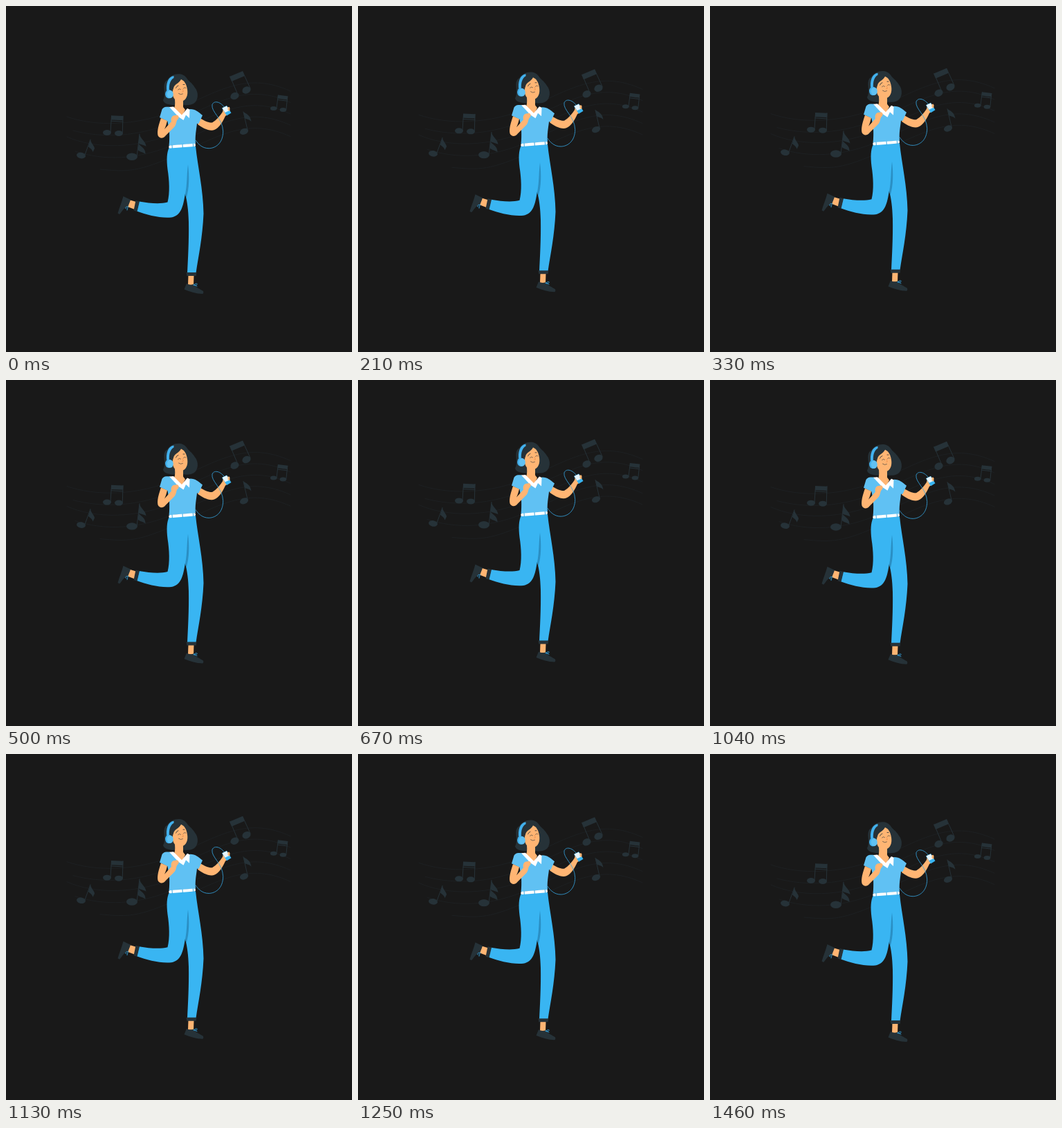
Animation, 500 px wide and 500 px high, one loop 1.5 s. Source, as an HTML page:

```html
<!DOCTYPE html>
<html lang="en">
<head>
<meta charset="utf-8">
<title>Dancing to music</title>
<style>
html, body { margin: 0; width: 100%; height: 100%; overflow: hidden; background: #191919; }
svg { display: block; width: 100%; height: 100%; }
.dark { fill: #263238; }
.skin { fill: #ffb573; }
.pants { fill: #39b5f2; }
.shirt { fill: #60c1f3; }
.white { fill: #fff; }
.line { fill: none; stroke-linecap: round; stroke-linejoin: round; }
.ink { stroke: #263238; }
.blue { stroke: #37a9e6; }
</style>
</head>
<body>
<svg viewBox="0 0 500 500">
<g id="scene">
  <g id="staff" class="line" stroke="#1f2325" stroke-width=".8"></g>

  <g id="notes" class="dark">
    <path d="M323 102L342 94L345 101L326 109Z"/>
    <path class="line ink" d="M324 102L335 128M342 95L353 119"/>
    <ellipse transform="translate(330.5 130) rotate(-25)" rx="6.3" ry="5"/>
    <ellipse transform="translate(347.5 121.5) rotate(-25)" rx="6.3" ry="5"/>

    <path d="M393 128.5L407.3 130.2L406.7 135.5L392.5 133.8Z"/>
    <path class="line ink" d="M393.3 129L391 148M392.5 135.5L406 137.2M406.8 131L404.8 150"/>
    <ellipse cx="386.7" cy="148" rx="4.8" ry="3"/>
    <ellipse cx="400.4" cy="150" rx="4.8" ry="3"/>

    <path d="M343 153C347 156 353 157 354.5 167C351 163 347 164 345 162Z"/>
    <path class="line ink" d="M343 153L349 179"/>
    <ellipse transform="translate(344 181.3) rotate(-22)" rx="6.3" ry="4.3"/>

    <path d="M152 158.3L169.5 159L169.2 165.3L152 164.5Z"/>
    <path class="line ink" d="M152.5 159L151 182M152 166.2L169 167.2M169 159L168.3 183"/>
    <ellipse cx="146" cy="183" rx="6" ry="4"/>
    <ellipse cx="163" cy="184" rx="6" ry="4"/>

    <path d="M122 193C123 199 128 202 128 206L125.5 211C124 206 121 206 119 203Z"/>
    <path class="line ink" d="M122 193L114 215"/>
    <ellipse transform="translate(108.5 216) rotate(10)" rx="6.5" ry="4.3"/>

    <path d="M193 185C194 192 202 195 202.5 203C199 200 194 201 191.5 198ZM191.5 199C195 203 202 206 201.5 214C198 211 193 211 190.5 208Z"/>
    <path class="line ink" d="M193 185L189.3 216"/>
    <ellipse cx="182" cy="217.8" rx="8" ry="5.2"/>
  </g>

  <g id="feet">
    <path class="skin" d="M178 280L188 283L186 294L175.5 290Z"/>
    <path class="dark" d="M169.5 275L180 280C179 284 177 287 176 291C170 291 168 297 164 301L161.5 299.5C164 291 167 284 169.5 275Z"/>
    <path class="line blue" stroke-width=".8" d="M177 290C173 289 171 293 174 293M176 291L175 295"/>
    <path class="skin" d="M263.5 389H271.5L271 403H263Z"/>
    <path class="dark" d="M261 401C264 403 268 403 271 402C274 407 281 409 285 412Q286 415 284 416C275 416 266 413 257.5 409.5Z"/>
    <path class="line blue" stroke-width=".8" d="M271 403C275 400 278 401 275 403.5L271 403L276 405"/>
  </g>

  <g id="legs">
    <path class="pants" d="M236 204C232 212 232 222 233.5 236C236 252 237 270 233.5 283.5C223 286.5 207 285 192.5 282.5L189 296.5C204 302 223 307 239 305.5C253 303 256 290 259 271C262 284 263.5 294 264 312C264.5 340 263 364 262 386H274.5C278 362 284 335 285.5 300C285 265 277 232 274 202.5Z"/>
    <path fill="#2a8fc4" d="M263 229C261 245 262 257 259 272L260.5 278C265 263 265 246 263 229Z"/>
    <path class="dark" d="M187.5 281L193 282.3L189.5 297L184.5 295.5Z"/>
    <path class="dark" d="M260.5 385H275.3L274.7 390H261.3Z"/>
  </g>

  <g id="head">
    <path class="dark" d="M233 107C239 97 255 95 261 104C264 109 268 110 273 118C279 125 278 137 271 141C264 145 257 142 251 143H240C232 142 228 140 227 136C231 129 228 122 228.5 115Q229 109 233 107Z"/>
    <path class="skin" d="M242 119C243 113 250 112 253 106C258 108 260.5 113 261.5 118C263.5 126 262 134 256 137L256 146L259 150L254 160L242 149Q245 146 244 135C240 130 240 124 242 119Z"/>
    <path class="line" stroke="#263238" stroke-width=".6" d="M248.5 121Q250.5 118.500 252.500 120.500M256.500 119Q258.500 116.500 260 118.500M249.500 126.500Q252.500 129 255.500 127"/>
    <path class="line" stroke="#263238" stroke-width=".8" d="M245.500 118.500Q246.500 115.500 249 115M256 113.500L258 113.500"/>
    <path class="line" stroke="#e78d4b" stroke-width=".7" d="M255 120L256.500 123.500L254.500 124"/>
    <path fill="#42b1ee" d="M242.500 101C234 102 230.500 113 232.500 124L236 122C235.500 114 237 107 242.500 104Z"/>
    <ellipse fill="#42b1ee" cx="235.300" cy="127.300" rx="5.200" ry="6.200"/>
    <ellipse class="shirt" cx="237.200" cy="127.500" rx="4.600" ry="5.800"/>
  </g>

  <g id="body">
    <path class="skin" d="M280 162C287 166 293 169 298 168.500C304 165 309 159 313 153L314 148L321 146C325 149 324 155 317 159C313 168 308 176 301 179C295 182 283 176 277 171Z"/>
    <path class="shirt" d="M237 146C229 145 226 147 225 151L222 161L233.500 166.500L236 181Q236.500 193 235.500 202L274 199C273 188 275 179 276 170L278.500 170L284 158C278 153 274 149 266 149L254 160Z"/>
    <path class="white" d="M236 146L242 145.500L254 157.500L262 148L265.500 149.500L265 162L260 157.500L256.500 165L249 160Z"/>
    <path class="skin" d="M224 162C221 171 218 180 219.500 187C222 192 227 192 230.500 187.500L243 175C247 171 245 166 249 163C251 159 248 157 245 158C239 158 238 163 239 167L229 178C231 174 232 170 233 166Z"/>
    <path class="line" stroke="#fff" stroke-width="4.200" d="M237.300 203.500L272 200.800"/>
    <path class="line blue" d="M240 201L240.300 206M255 200L255.300 205M270.300 199L270.600 203.500"/>
  </g>

  <g id="player">
    <path class="line blue" stroke-width=".8" d="M316 147C311 139 301 135.500 298 142.500C296 153 313 162 313.700 181C313.700 199 302 205.700 293 205.700C284 205.700 278 200 274 194"/>
    <path class="pants" d="M312 147.500L319 144L325.500 154.500L319 158.500Z"/>
    <path fill="#e8f6ff" d="M312.500 147.500L319 144.500L323 151L316.500 154Z"/>
    <path class="skin" d="M320.500 147Q322.500 144.500 323.500 147.500L323 152L320.500 150.500Z"/>
  </g>
</g>
</svg>
<script>
const scene = document.getElementById("scene");
const starts = [[88, 160], [97, 180], [88, 189], [100, 210], [136, 236]];
document.getElementById("staff").innerHTML = starts.map(([x, y], i) => {
  const d = i * 16.4;
  return `<path d="M${x} ${y}C${x + 40} ${174 + d} 190 ${175 + d} 250 ${148 + d}S350 ${95 + d} 411 ${123 + d}"/>`;
}).join("");

const LOOP = 1500, STEPS = 35, STEP = LOOP / 36, RISE = 9.4;

// The whole scene rises and falls at constant speed, in discrete steps.
function draw(now) {
  const step = Math.min(STEPS, Math.floor((now % LOOP + 5) / STEP));
  const lift = RISE * (1 - Math.abs(1 - 2 * step / STEPS));
  scene.setAttribute("transform", `translate(0 ${-lift.toFixed(2)})`);
  requestAnimationFrame(draw);
}
draw(performance.now());
</script>
</body>
</html>
```
